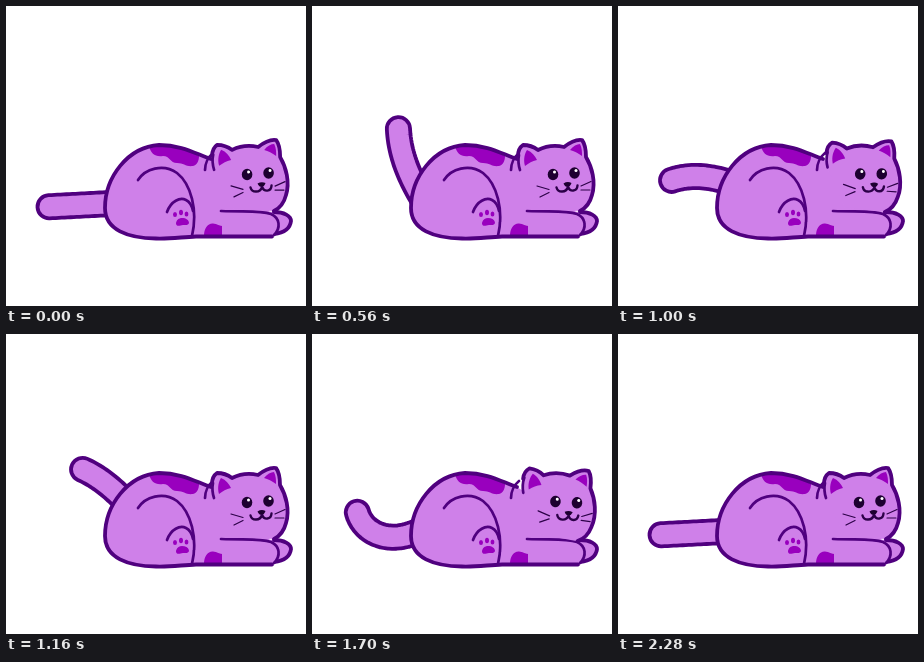
These frames come from a looping animation (300x300 px, 2.32 s). An HTML page:

```html
<!DOCTYPE html>
<html lang="en">
<head>
<meta charset="utf-8">
<title>Resting cat</title>
<style>
  html, body { margin: 0; width: 100%; height: 100%; overflow: hidden; background: #fff; }
  svg { display: block; width: 100vw; height: 100vh; }
  path { stroke-linecap: round; stroke-linejoin: round; }
  .skin { fill: #cf80e9; }
  .line { fill: none; stroke: #50007f; stroke-width: 3.8; }
  .fine { fill: none; stroke: #50007f; stroke-width: 2.7; }
  .spot { fill: #9900be; }
  .dark { fill: #1d0030; }
  .thin { fill: none; stroke: #2c0048; stroke-width: 1.2; }
  .mouth { fill: none; stroke: #2c0048; stroke-width: 2.4; }
  .tail { fill: none; }
</style>
</head>
<body>
<svg viewBox="0 0 300 300">
  <path class="tail" id="rim" stroke="#50007f" stroke-width="27"/>
  <path class="tail" id="core" stroke="#cf80e9" stroke-width="19.400"/>

  <path class="skin" d="M205 153C190 148 176 139 153 139C122 141 99 171 99 202C99 224 122 232 150 232.500C165 233 176 231 190 230.500H266L262 190Z"/>
  <path class="spot" d="M143 140C145 148 149 151 157 150C164 150 164 157 171 157C178 157 180 161 187 160C191 159 193 155 193 150L176 142C166 138 153 138 143 140Z"/>
  <path class="spot" d="M198 230C198 222 202 217 207 217.500C212 218 214 221 220 220C226 217 231 216 234 220C236 223 236 226 236 230Z"/>

  <!-- front paws -->
  <path class="skin" d="M262 206C274 205 285 208 285 215C284 224 275 228 266 229Z"/>
  <path class="line" d="M268 206C278 206 285 210 285 215C284 223 277 227 268 228"/>
  <path class="skin" d="M216 205C240 206 254 204 265 208C274 212 275 222 268 229H216Z"/>
  <path class="fine" d="M215 205C240 206 254 204 265 208C274 212 275 222 268 229"/>
  <path class="line" d="M205 153C190 148 176 139 153 139C122 141 99 171 99 202C99 224 122 232 150 232.500C165 233 176 231 190 230.500H266"/>

  <!-- hind leg -->
  <path class="fine" d="M132 174C139 163 157 157 171 167C185 178 192 204 186 230"/>
  <path class="fine" d="M161 206C165 195 174 191 180 194C184 196 186 200 187 205"/>
  <g class="spot">
    <path d="M170 218C170 214 173 212 176 212C180 212 183 214 183 217C182 220 179 218.500 177 219C174 219.500 171 221 170 218Z"/>
    <ellipse cx="169" cy="208.500" rx="2" ry="2.600"/>
    <ellipse cx="175" cy="206.500" rx="2" ry="2.800"/>
    <ellipse cx="180.500" cy="208" rx="1.900" ry="2.600"/>
  </g>

  <path class="fine" d="M199 164C199 158 202 151 207 147"/>

  <g id="head">
    <path class="skin" d="M208 165C204 153 206 143 211 139C217 139 222 141 226 144C234 140 243 139 252 141C257 137 264 133 270 134C273 138 274 145 274 151C280 161 284 176 280 189C278 197 274 202 268 205L228 203Z"/>
    <path class="fine" d="M208 164C206 158 206 154 207 149"/>
    <path class="line" d="M206 150C206 145 208 141 211 139C217 139 222 141 226 144C234 140 243 139 252 141C257 137 264 133 270 134C273 138 274 145 274 151C280 161 284 176 280 189C278 197 274 202 268 205"/>
    <path class="spot" d="M213 160C211 153 213 147 215 144C220 146 223 150 225 154C220 155 217 157 213 160Z"/>
    <path class="spot" d="M258 144C261 140 265 138 268 138C270 142 270 146 270 150C266 147 262 145 258 144Z"/>
    <ellipse class="dark" cx="241" cy="168.500" rx="5.300" ry="5.700"/>
    <ellipse class="dark" cx="262.500" cy="167" rx="5.300" ry="5.700"/>
    <circle fill="#fff" cx="242.500" cy="166" r="1.500"/>
    <circle fill="#fff" cx="264" cy="164.500" r="1.500"/>
    <path class="dark" d="M251.500 177.500Q255.500 175 259.500 177Q258 181 255.800 181Q253 181 251.500 177.500Z"/>
    <path class="mouth" d="M244.500 181.500C246 187 254 187 256 181C258 186 265 186 265.500 179.500"/>
    <path class="thin" d="M225 180L237 183.500M228 191L237 186.500M269 180L279 175.500M269 184H278"/>
  </g>
</svg>
<script>
const LOOP = 2320, STEP = 20;
const LAG = 200, WHIP = 2, REST = 183;   // the tip follows the base late and swings wider
const rim = document.getElementById('rim');
const core = document.getElementById('core');
const head = document.getElementById('head');

// Turning points of the tail; 180 degrees is left, 90 is up.
const turns = [
  { t: 0, angle: REST, x: 115, y: 197, len: 72 },
  { t: 150, angle: 195, x: 112, y: 199, len: 72 },
  { t: 510, angle: 104, x: 112, y: 196, len: 78 },
  { t: 690, angle: 196, x: 110, y: 190, len: 74 },
  { t: 1370, angle: 118, x: 122, y: 161, len: 48 },
  { t: 1730, angle: 208, x: 112, y: 195, len: 80 },
  { t: 2080, angle: REST, x: 115, y: 197, len: 72 }
];
const nods = [230, 870, 1690];

function swing(time) {
  const t = (time + LOOP) % LOOP;
  const i = turns.findLastIndex(p => p.t <= t);
  const a = turns[i], b = turns[i + 1] || a;
  const u = a === b ? 0 : (t - a.t) / (b.t - a.t);
  const ease = (1 - Math.cos(Math.PI * u)) / 2;
  const mix = key => a[key] + (b[key] - a[key]) * ease;
  return { angle: mix('angle'), x: mix('x'), y: mix('y'), len: mix('len') };
}

function tailPath(t) {
  const parts = 24;
  let { angle, x, y, len } = swing(t);
  const tip = REST + WHIP * (swing(t - LAG).angle - REST);
  let d = `M${x.toFixed(2)} ${y.toFixed(2)}`;
  for (let i = 0; i < parts; i++) {
    const bend = ((i + 0.5) / parts) ** 1.5;
    const a = (angle + (tip - angle) * bend) * Math.PI / 180;
    x += Math.cos(a) * len / parts;
    y -= Math.sin(a) * len / parts;
    d += `L${x.toFixed(2)} ${y.toFixed(2)}`;
  }
  return d;
}

// The head tips forward each time the tail comes down.
function tilt(t) {
  return nods.reduce((sum, at) => {
    const u = Math.min(1, Math.abs(t - at) / 260);
    return sum + 3.7 * (1 + Math.cos(Math.PI * u));
  }, 0);
}

function draw(t) {
  const d = tailPath(t);
  rim.setAttribute('d', d);
  core.setAttribute('d', d);
  head.setAttribute('transform', `rotate(${tilt(t).toFixed(2)} 250 187)`);
}

const start = performance.now();
function tick() {
  const t = (performance.now() - start) % LOOP;
  draw(Math.floor(t / STEP) * STEP);
  requestAnimationFrame(tick);
}
draw(0);
requestAnimationFrame(tick);
</script>
</body>
</html>
```
